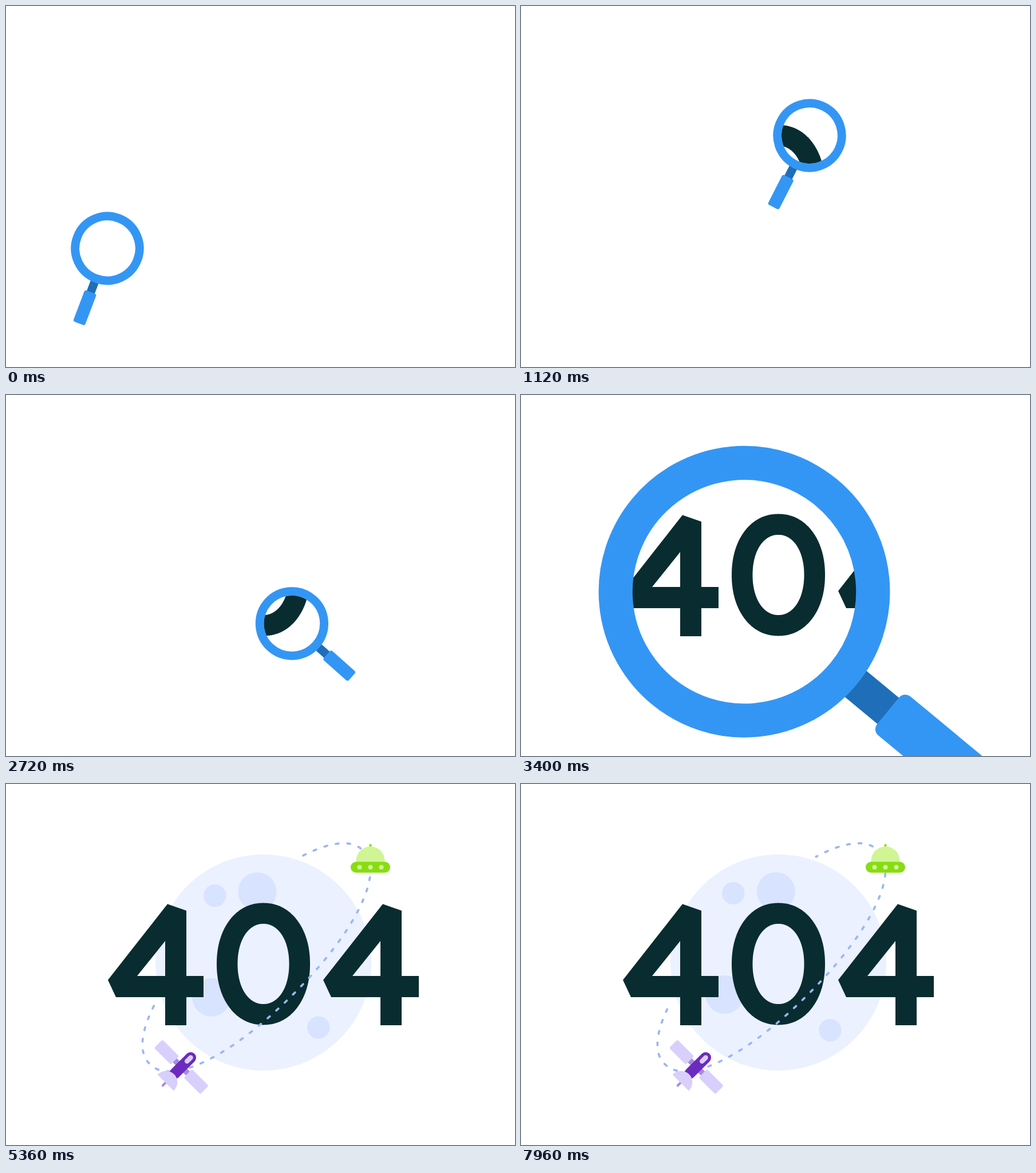
These frames come from a looping animation (889 px wide and 630 px high, 8000 ms). An HTML page:

```html
<!DOCTYPE html>
<html lang="en">
<head>
<meta charset="utf-8">
<title>404</title>
<style>
html, body { margin: 0; width: 100%; height: 100%; overflow: hidden; background: #fff; }
svg { display: block; width: 100vw; height: 100vh; }
</style>
</head>
<body>
<svg viewBox="0 0 889 630">
  <defs>
    <clipPath id="lensClip"><circle id="lensHole"/></clipPath>
    <mask id="trim" maskUnits="userSpaceOnUse" x="0" y="0" width="889" height="630">
      <path id="trimPath" fill="none" stroke="#fff" stroke-width="14"/>
    </mask>
    <path id="four" fill-rule="evenodd" d="M178 342L282 209.500L315 221V335H345V372H315V421H278V372H192ZM278 274V335H229Z"/>
  </defs>

  <g id="moon">
    <circle cx="449.500" cy="311.500" r="188.500" fill="#ebf1ff"/>
    <g id="craters" fill="#d8e3ff">
      <circle cx="362.500" cy="196.500" r="19.700"/>
      <circle cx="436.500" cy="188" r="33.500"/>
      <circle cx="360" cy="374" r="33.500"/>
      <circle cx="548" cy="423" r="19.700"/>
    </g>
  </g>

  <g id="digits" fill="#092c30">
    <use href="#four"/>
    <path id="zero" fill-rule="evenodd"/>
    <use href="#four" x="376"/>
  </g>

  <g mask="url(#trim)">
    <path id="orbit" fill="none" stroke="#9ab6f7" stroke-width="3.700" stroke-linecap="round" stroke-dasharray="5 15.250"/>
  </g>

  <g id="ufo">
    <path d="M636.500 107V112" stroke="#89dc13" stroke-width="2.500"/>
    <circle cx="636.500" cy="107" r="2.200" fill="#89dc13"/>
    <path d="M611.500 137V134A25 25 0 0 1 661.500 134V137Z" fill="#d0f594"/>
    <rect x="602" y="135.700" width="69" height="19" rx="9.500" fill="#89dc13"/>
    <g fill="#d0f594">
      <circle cx="617.500" cy="145.200" r="4"/>
      <circle cx="636.500" cy="145.200" r="4"/>
      <circle cx="655.500" cy="145.200" r="4"/>
    </g>
  </g>

  <g id="satellite">
    <g transform="translate(306.300 493.700) rotate(45)">
      <path d="M-17 0H17" stroke="#a88ae4" stroke-width="10"/>
      <path d="M0 37V46" stroke="#a88ae4" stroke-width="4" stroke-linecap="round"/>
      <g fill="#d9cffc">
        <rect x="-57" y="-10.300" width="41" height="20.600" rx="3"/>
        <rect x="16" y="-10.300" width="41" height="20.600" rx="3"/>
      </g>
      <rect x="-9.500" y="-32.500" width="19" height="58" rx="9.500" fill="#6d2abf"/>
      <rect x="-4.200" y="-27.200" width="8.400" height="17.500" rx="4.200" fill="#d9cffc"/>
      <path d="M-20 39A20 21 0 0 1 20 39Z" fill="#d9cffc"/>
    </g>
  </g>

  <g id="lens">
    <rect x="-7.400" y="60" width="14.800" height="24" fill="#1f6eb9"/>
    <rect x="-11" y="81.500" width="22" height="58.500" rx="3.500" fill="#3496f4"/>
    <circle r="56.200" fill="none" stroke="#3496f4" stroke-width="14.800"/>
  </g>
</svg>
<script>
const LOOP = 8000, STEP = 40, ZOOM = 3360, ZOOM_END = 3470;
const $ = id => document.getElementById(id);
const set = (id, attrs) => { for (const k in attrs) $(id).setAttribute(k, attrs[k]); };
const show = (id, on) => set(id, { display: on ? 'inline' : 'none' });
const clamp = x => Math.max(0, Math.min(1, x));
const span = (t, a, b) => clamp((t - a) / (b - a));
const easeInOut = x => (1 - Math.cos(Math.PI * x)) / 2;
const easeOut = x => Math.sin(x * Math.PI / 2);

// time, x, y, tilt of the magnifier
const KEYS = [
  [0, 177, 423, 20.8],
  [400, 182, 352, 35],
  [840, 325.5, 246.5, 38.6],
  [1120, 504, 226, 27],
  [1680, 671.5, 250.5, 4],
  [1880, 706, 299, -4],
  [2040, 700.5, 349, -11.3],
  [2520, 549.5, 408.7, -44],
  [3360, 390, 343.3, -50.4]
];

function slope(i, k) {
  if (i === 0 || i === KEYS.length - 1) return 0;
  const a = KEYS[i - 1], b = KEYS[i + 1];
  return (b[k] - a[k]) / (b[0] - a[0]);
}

// cubic Hermite through the keys, at rest at both ends
function pose(t) {
  let i = 0;
  while (i < KEYS.length - 2 && t > KEYS[i + 1][0]) i++;
  const a = KEYS[i], b = KEYS[i + 1], h = b[0] - a[0], s = span(t, a[0], b[0]);
  const w = s * s * (3 - 2 * s);
  return [1, 2, 3].map(k =>
    a[k] + (b[k] - a[k]) * w
    + h * s * (1 - s) * (slope(i, k) * (1 - s) - slope(i + 1, k) * s));
}

// grow past full size, then settle
function pop(t, start, rise, fall, peak) {
  const top = start + rise;
  return t < top
    ? peak * easeOut(span(t, start, top))
    : peak + (1 - peak) * easeInOut(span(t, top, top + fall));
}

function scaleAt(id, s, x, y) {
  show(id, s > 0);
  set(id, { transform: `translate(${x} ${y}) scale(${s}) translate(${-x} ${-y})` });
}

// slightly squared oval between two angles, turned by tilt
function oval(cx, cy, a, b, from = 0, to = 360, tilt = 0) {
  const rad = Math.PI / 180, n = 240, pts = [];
  const bulge = x => Math.sign(x) * Math.abs(x) ** (2 / 2.12);
  const c = Math.cos(tilt * rad), s = Math.sin(tilt * rad);
  for (let i = 0; i <= n; i++) {
    const angle = (from + (to - from) * i / n) * rad;
    const u = a * bulge(Math.cos(angle)), v = b * bulge(Math.sin(angle));
    pts.push(`${(cx + u * c - v * s).toFixed(2)} ${(cy + u * s + v * c).toFixed(2)}`);
  }
  return 'M' + pts.join('L');
}

set('zero', { d: oval(449.5, 314, 81.5, 106.4) + 'Z' + oval(449.5, 314, 45, 70) + 'Z' });

const track = oval(437.4, 302.5, 263.5, 91, -48.8, 228, -45);
set('orbit', { d: track });
set('trimPath', { d: track });
const trackLength = $('trimPath').getTotalLength();
set('trimPath', { 'stroke-dasharray': `${trackLength} ${trackLength + 50}` });

function drawLens(t) {
  const on = t < ZOOM_END;
  show('lens', on);
  if (!on) return $('digits').removeAttribute('clip-path');
  const [x, y, tilt] = pose(t);
  const s = 1 + 3 * Math.max(0, t - ZOOM) / STEP;
  set('lens', { transform: `translate(${x} ${y}) rotate(${tilt}) scale(${s})` });
  set('lensHole', { cx: x, cy: y, r: 49.2 * s });
  set('digits', { 'clip-path': 'url(#lensClip)' });
}

function drawSpace(t) {
  const sec = (t - 4360) / 1000;
  scaleAt('moon', pop(t, 3650, 300, 160, 1.1), 449.5, 311.5);
  set('craters', { transform: `rotate(${1.13 * sec} 449.5 311.5)` });

  const drawn = easeInOut(span(t, 3960, 4800));
  show('orbit', drawn > 0);
  set('trimPath', { 'stroke-dashoffset': trackLength * (1 - drawn) });
  set('orbit', { 'stroke-dashoffset': -(1.3 + 4.2 * sec + 0.24 * sec * sec) });

  scaleAt('ufo', pop(t, 4248, 230, 130, 1.17), 636.5, 130.7);
  scaleAt('satellite', pop(t, 4500, 230, 130, 1.16), 306.3, 493.7);
}

// motion advances at 25 pictures a second
function render(time) {
  const t = Math.floor((time + 1) / STEP) * STEP % LOOP;
  drawLens(t);
  drawSpace(t);
}

const begin = performance.now();
function tick() {
  render((performance.now() - begin) % LOOP);
  requestAnimationFrame(tick);
}
tick();
</script>
</body>
</html>
```
